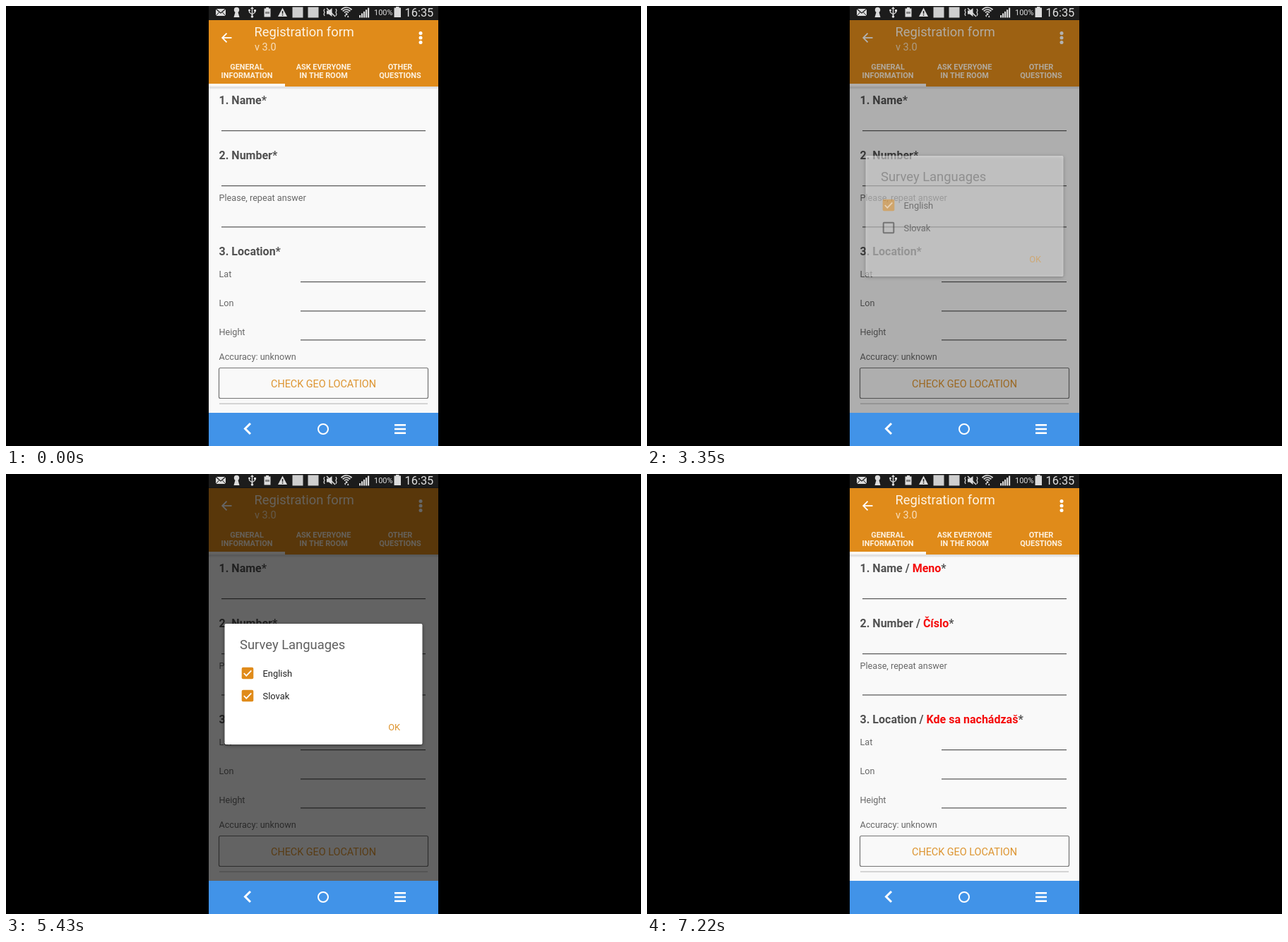
An HTML page with a canvas that plays this animation: 899x623 px, repeating every 8000 ms.

```html
<!DOCTYPE html>
<html lang="en">
<head>
<meta charset="utf-8">
<title>Survey languages</title>
<style>
html, body { margin: 0; width: 100%; height: 100%; overflow: hidden; background: #000; }
canvas { display: block; }
</style>
</head>
<body>
<canvas id="stage" width="899" height="623"></canvas>
<script>
const ctx = document.getElementById('stage').getContext('2d');
const LOOP = 8000;
const ORANGE = '#e08b1a', PAPER = '#f9f9f9', BLUE = '#4193e8', ICON = '#dcdcdc', BAR = '#1c1c1c';

// Each step holds until the next one begins.
const steps = [
  { at: 0 },
  { at: 500, ripple: true, touch: [587, 46] },
  { at: 650, menu: 0.6 },
  { at: 800, menu: 1 },
  { at: 2900, menu: 1, pressed: true, touch: [530, 56] },
  { at: 3050, menu: 1, pressed: true },
  { at: 3200 },
  { at: 3350, dialog: 0.5 },
  { at: 3490, dialog: 1 },
  { at: 5290, dialog: 1, pressed: true, touch: [389, 321] },
  { at: 5430, dialog: 1, slovak: true },
  { at: 6930, dialog: 1, slovak: true, touch: [563, 366.5] },
  { at: 7070, dialog: 0.5, slovak: true },
  { at: 7220, translated: true }
];

function rect(x, y, w, h, color) {
  ctx.fillStyle = color;
  ctx.fillRect(x, y, w, h);
}

function text(str, x, y, size, color, weight = 400, align = 'left') {
  ctx.font = `${weight} ${size}px Roboto, sans-serif`;
  ctx.textAlign = align;
  ctx.fillStyle = color;
  ctx.fillText(str, x, y);
  return x + ctx.measureText(str).width;
}

function disc(x, y, r, color) {
  ctx.beginPath();
  ctx.arc(x, y, r, 0, Math.PI * 2);
  ctx.fillStyle = color;
  ctx.fill();
}

function path(points, color, width, closed) {
  ctx.beginPath();
  points.forEach(([x, y]) => ctx.lineTo(x, y));
  if (closed) ctx.closePath();
  if (width) {
    ctx.strokeStyle = color;
    ctx.lineWidth = width;
    ctx.stroke();
  } else {
    ctx.fillStyle = color;
    ctx.fill();
  }
}

function panel(x, y, w, h, color, blur, drop) {
  ctx.save();
  ctx.shadowColor = 'rgba(0,0,0,.55)';
  ctx.shadowBlur = blur;
  ctx.shadowOffsetY = drop;
  ctx.beginPath();
  ctx.roundRect(x, y, w, h, 2);
  ctx.fillStyle = color;
  ctx.fill();
  ctx.restore();
}

function withAlpha(alpha, draw) {
  ctx.save();
  ctx.globalAlpha = alpha;
  draw();
  ctx.restore();
}

function statusBar() {
  rect(287, 0, 325, 20, BAR);
  // mail
  rect(297, 4, 14, 10, ICON);
  path([[297, 4], [304, 10], [311, 4]], BAR, 1.2);
  path([[297, 14], [302, 8.5]], BAR, 1);
  path([[311, 14], [306, 8.5]], BAR, 1);
  // keyhole
  disc(326.5, 5.5, 3.7, ICON);
  path([[325, 7], [328, 7], [330.5, 16], [322.5, 16]], ICON);
  // usb
  path([[348.5, 3], [348.5, 15]], ICON, 1.4);
  path([[344.5, 6], [344.5, 9], [348.5, 12], [352.5, 9], [352.5, 6]], ICON, 1.2);
  path([[346, 4], [348.5, 1], [351, 4]], ICON);
  disc(348.5, 15, 1.8, ICON);
  disc(344.5, 6, 1.5, ICON);
  rect(351, 5, 3, 3, ICON);
  // battery notice
  rect(368, 2, 4, 2, ICON);
  rect(365.5, 3.5, 9, 12, ICON);
  rect(367, 8, 6, 3, '#888');
  // warning
  path([[391.5, 2.5], [398, 15], [385, 15]], ICON, 0, true);
  rect(390.8, 7, 1.5, 4, BAR);
  rect(390.8, 12, 1.5, 1.5, BAR);
  // app notices
  rect(405.5, 1.5, 15, 15, '#cfcfcf');
  rect(427.5, 1.5, 15, 15, '#cfcfcf');
  // muted, vibrating
  path([[454, 6.5], [457, 6.5], [461.5, 3], [461.5, 15], [457, 11.5], [454, 11.5]], ICON);
  path([[454, 3], [466, 15]], ICON, 1.5);
  for (const [x, d] of [[451, -1], [467, 1]]) {
    path([[x, 4], [x + d, 6.5], [x, 9], [x + d, 11.5], [x, 14]], ICON, 1.2);
  }
  // wifi
  ctx.strokeStyle = ICON;
  ctx.lineWidth = 1.7;
  for (const r of [4, 7, 10]) {
    ctx.beginPath();
    ctx.arc(482, 12, r, -Math.PI * 0.77, -Math.PI * 0.23);
    ctx.stroke();
  }
  disc(482, 11.5, 1.5, ICON);
  path([[479, 13], [481.5, 13], [480.2, 16]], ICON);
  path([[483, 16], [485.5, 16], [484.2, 13]], ICON);
  // signal
  for (let i = 0; i < 5; i++) rect(500 + i * 3, 13 - i * 2.6, 2.2, 3.5 + i * 2.6, ICON);
  text('100%', 521, 13, 11, ICON);
  rect(552, 1, 4.5, 2, ICON);
  rect(549.5, 2.5, 9.5, 13.5, ICON);
  text('16:35', 564.5, 14.5, 16.4, '#e2e2e2');
}

function header() {
  rect(287, 19.5, 325, 94.5, ORANGE);
  path([[319.5, 45], [306.5, 45]], '#fff', 1.8);
  path([[312.5, 38.7], [306.2, 45], [312.5, 51.3]], '#fff', 1.8);
  text('Registration form', 351.5, 43, 18.3, '#fdf3e4');
  text('v 3.0', 352, 63, 14.4, '#f8dfbd');
  for (const y of [38.5, 45, 51.5]) disc(587, y, 2.5, '#fff');
  const tabs = [
    [341, 'GENERAL', 'INFORMATION'],
    [449.5, 'ASK EVERYONE', 'IN THE ROOM'],
    [558, 'OTHER', 'QUESTIONS']
  ];
  for (const [x, top, bottom] of tabs) {
    text(top, x, 90, 10.9, '#fdf1df', 700, 'center');
    text(bottom, x, 102, 10.9, '#fdf1df', 700, 'center');
  }
  rect(287, 110, 108, 4, '#fbf8f4');
  const shade = ctx.createLinearGradient(0, 114, 0, 118);
  shade.addColorStop(0, '#dcdcdc');
  shade.addColorStop(1, '#ececec');
  rect(287, 114, 325, 3.5, shade);
}

function question(label, translation, y) {
  const grey = '#515151';
  let x = text(label, 301.5, y, 16, grey, 700);
  if (translation) {
    x = text(' / ', x, y, 16, grey, 700);
    x = text(translation, x, y, 16, '#f50a0a', 700);
  }
  text('*', x, y, 16, grey, 700);
}

function form(translated) {
  rect(287, 114, 325, 462, PAPER);
  header();
  question('1. Name', translated && 'Meno', 139);
  question('2. Number', translated && 'Číslo', 217);
  question('3. Location', translated && 'Kde sa nachádzaš', 353);
  for (const y of [176, 254, 312.3]) rect(305, y, 289, 1.2, '#555');
  const notes = [['Please, repeat answer', 276], ['Lat', 384], ['Lon', 425], ['Height', 466], ['Accuracy: unknown', 501]];
  for (const [str, y] of notes) text(str, 301.5, y, 12.65, '#686868');
  for (const y of [390, 431.3, 472.3]) rect(417, y, 177, 1.2, '#555');
  ctx.beginPath();
  ctx.roundRect(301.5, 512.5, 296, 43, 2);
  ctx.strokeStyle = '#747474';
  ctx.lineWidth = 1.2;
  ctx.stroke();
  text('CHECK GEO LOCATION', 449.5, 539.5, 14.4, '#dd942f', 400, 'center');
  rect(302, 562.5, 295, 1.2, '#bdbdbd');
}

function navBar() {
  rect(287, 576, 325, 47, BLUE);
  path([[346, 591], [338.5, 598.5], [346, 606]], '#fff', 3);
  ctx.beginPath();
  ctx.arc(449, 599, 7, 0, Math.PI * 2);
  ctx.lineWidth = 2;
  ctx.stroke();
  for (const y of [592, 597.7, 603.4]) rect(550, y, 16, 2.6, '#fff');
}

function menu(pressed) {
  panel(428, 26.5, 177, 87.5, '#fafafa', 6, 2);
  if (pressed) rect(428, 27, 177, 43, '#e6e4e6');
  text('Languages', 442, 54, 14.5, '#333');
  text('Clear', 442, 97.5, 14.5, '#333');
}

function checkbox(y, checked) {
  ctx.beginPath();
  if (checked) {
    ctx.roundRect(333.7, y - 8.2, 16.6, 16.4, 2);
    ctx.fillStyle = ORANGE;
    ctx.fill();
    path([[336.8, y], [340.3, y + 3.7], [347.3, y - 3.6]], '#fff', 1.8);
  } else {
    ctx.roundRect(334.7, y - 7.2, 14.6, 14.4, 1);
    ctx.strokeStyle = '#2b2b2b';
    ctx.lineWidth = 2;
    ctx.stroke();
  }
}

function dialog(pressed, slovak) {
  rect(287, 19.5, 325, 556.5, 'rgba(0,0,0,.6)');
  panel(309.5, 212, 280, 171, '#fff', 5, 1);
  text('Survey Languages', 331, 248, 18.4, '#606060');
  if (pressed) {
    rect(324.5, 300, 250.5, 32, '#e9e7e9');
    rect(328, 300, 247, 29, '#dad8db');
  }
  checkbox(282, true);
  checkbox(314, slovak);
  text('English', 363.5, 287, 12.9, '#222');
  text('Slovak', 363.5, 319, 12.9, '#222');
  text('OK', 541.3, 363, 12.8, '#dd942f');
}

function touch([x, y]) {
  const glow = ctx.createRadialGradient(x, y, 0, x, y, 10);
  glow.addColorStop(0, 'rgba(205,205,205,.95)');
  glow.addColorStop(0.4, 'rgba(218,218,218,.95)');
  glow.addColorStop(0.7, 'rgba(242,242,242,.92)');
  glow.addColorStop(1, 'rgba(240,240,240,.9)');
  disc(x, y, 10, glow);
  ctx.strokeStyle = '#c6c6ca';
  ctx.lineWidth = 1.1;
  ctx.stroke();
}

function draw(step) {
  rect(0, 0, 899, 623, '#000');
  form(step.translated);
  statusBar();
  if (step.ripple) disc(587, 45.5, 22.5, 'rgba(255,255,255,.2)');
  if (step.menu) withAlpha(step.menu, () => menu(step.pressed));
  if (step.dialog) withAlpha(step.dialog, () => dialog(step.pressed, step.slovak));
  navBar();
  if (step.touch) touch(step.touch);
}

const start = performance.now();
function tick() {
  const time = (performance.now() - start) % LOOP;
  draw(steps.findLast(step => step.at <= time));
  requestAnimationFrame(tick);
}
tick();
</script>
</body>
</html>
```
